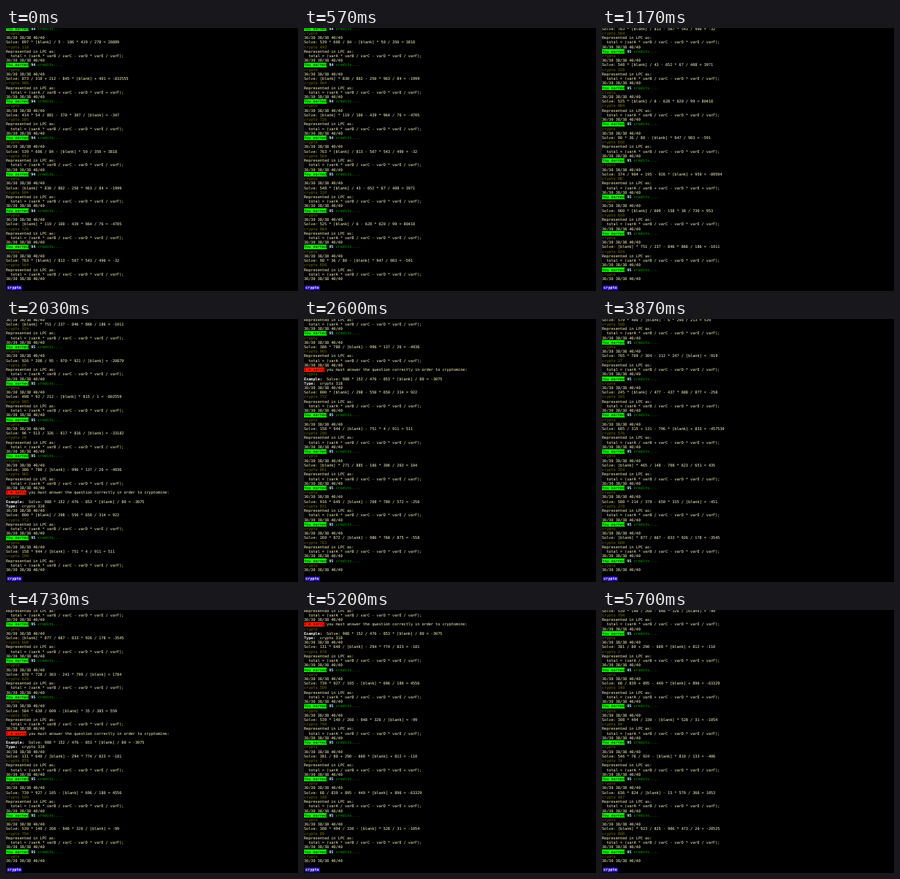
Recreate the animation shown at these times as an HTML page. Size 400 by 360 pixels, loop 5.73 s.

```html
<!DOCTYPE html>
<html lang="en">
<head>
<meta charset="utf-8">
<title>Terminal log</title>
<style>
  html, body { margin: 0; width: 100%; height: 100%; overflow: hidden; background: #000; }
  svg { display: block; width: 100vw; height: 100vh; }
  text {
    font: 5.16px "DejaVu Sans Mono", monospace;
    white-space: pre;
    text-rendering: geometricPrecision;
    fill: #ffffcc;
  }
  .echo { fill: #787000; }
  .dark { fill: #000; }
  .count { fill: #b8ffff; font-weight: bold; }
  .credits { fill: #00a800; }
  .strong { fill: #fff; font-weight: bold; }
</style>
</head>
<body>
<svg viewBox="0 0 400 360">
  <rect width="400" height="360"/>
  <g id="log"></g>
  <rect x="1" y="352.4" width="21" height="6.8" fill="#2408a8"/>
  <text class="strong" x="2" y="357.3">crypto</text>
</svg>
<script>
const LOOP = 5730, FRAMES_PER_MS = 0.03;
const ROW = 6.225, LAST_BASELINE = 345, ROWS = 57, CHAR = 3.106;
const STATUS = "30/30 38/38 40/40";
const FIRST_SHOWN = 13;

// The bracketed operand is the answer; it is printed as [blank].
const problems = `
897 * [118] / 5 - 186 * 419 / 278
873 / 310 + 212 - 845 * [986] + 401
414 * 54 / 881 - 370 * 307 / [305]
539 * 606 / 84 - [493] * 50 / 350
[904] * 830 / 802 - 256 * 963 / 84
[726] * 119 / 100 - 439 * 964 / 76
763 * [564] / 813 - 507 * 543 / 490
548 * [320] / 43 - 652 * 67 / 408
525 * [964] / 6 - 628 * 620 / 99
90 * 36 / 80 - [656] * 947 / 983
374 / 904 + 195 - 926 * [98] + 959
960 * [610] / 609 - 158 * 38 / 730
[924] * 751 / 237 - 846 * 866 / 186
926 * 208 / 95 - 970 * 921 / [39]
498 * 92 / 212 - [985] * 815 / 1
96 * 513 / 326 - 817 * 816 / [20]
386 * 780 / [965] - 996 * 137 / 26
800 * [772] / 298 - 556 * 650 / 314
158 * 944 / [290] - 751 * 4 / 911
[861] * 271 / 885 - 106 * 306 / 203
916 * 649 / [831] - 708 * 780 / 572
269 * 872 / [763] - 986 * 768 / 875
425 * 62 / 766 - [469] * 319 / 676
579 * 480 / [508] - 6 * 298 / 213
765 * 769 / 304 - 312 * 247 / [27]
245 * [165] / 477 - 437 * 688 / 877
685 / 315 + 131 - 796 * [576] + 833
[354] * 465 / 148 - 708 * 623 / 651
588 * 214 / 379 - 650 * 335 / [278]
[600] * 877 / 667 - 833 * 926 / 178
870 * 728 / 303 - 241 * 799 / [628]
584 * 630 / 609 - [501] * 35 / 385
131 * 640 / [878] - 294 * 774 / 823
739 * 927 / 105 - [509] * 696 / 180
539 * 140 / 260 - 948 * 326 / [794]
381 / 80 + 290 - 608 * [2] + 812
68 / 839 + 895 - 440 * [148] + 896
308 * 494 / 330 - [89] * 528 / 31
546 * 76 / 924 - [74] * 810 / 133
636 * 824 / [487] - 15 * 579 / 366
[806] * 923 / 825 - 906 * 473 / 20`.trim().split("\n");

const rejected = new Set([17, 32]);

// Integer arithmetic: each product or quotient is truncated.
function evaluate(expression) {
  const [first, ...rest] = expression.replace(/[[\]]/g, "").split(" ");
  let total = 0, term = +first;
  for (let i = 0; i < rest.length; i += 2) {
    const op = rest[i], value = +rest[i + 1];
    if (op === "*") term *= value;
    else if (op === "/") term = Math.trunc(term / value);
    else { total += term; term = op === "-" ? -value : value; }
  }
  return total + term;
}

const span = (name, text) => `<tspan class="${name}">${text}</tspan>`;
const row = (markup, back = "", length = 0) => ({ markup, back, length });
const echo = text => row(span("echo", text));
const solve = expression =>
  `Solve: ${expression.replace(/\[\d+\]/, "[blank]")} = ${evaluate(expression)}`;

function question(expression) {
  let index = 0;
  const formula = expression.replace(/\[?\d+\]?/g, () => "var" + "ABCDEF"[index++]);
  return [
    row(solve(expression)),
    echo("crypto " + expression.match(/\[(\d+)\]/)[1]),
    row("Represented in LPC as:"),
    row(`  total = (${formula});`),
    row(STATUS)
  ];
}

function reply(number) {
  if (rejected.has(number)) return [
    row(span("dark", "I'm sorry") +
      " you must answer the question correctly in order to cryptomine:", "#ff1a00", 9),
    echo("crypto"),
    row(span("strong", "Example:") + "  " + solve("988 * 152 / 476 - 853 * [318] / 80")),
    row(span("strong", "Type:") + "  crypto 318"),
    row(STATUS)
  ];
  const credits = number < 7 ? 94 : 95;
  return [
    row(`${span("dark", "You earned")} ${span("count", credits)} ${span("credits", "credits....")}`,
      "#10ff00", 10),
    echo("crypto"),
    row(STATUS)
  ];
}

const messages = [reply(0)];
problems.forEach((expression, i) => messages.push(question(expression), reply(i + 1)));

// Pace of arriving messages: [frame, messages since the start].
const pace = [[0, 0], [35, 13], [61, 24], [95, 38], [116, 47], [142, 57], [171, 69]];

function messagesAt(frame) {
  const i = Math.max(1, pace.findIndex(p => p[0] >= frame));
  const [f0, n0] = pace[i - 1], [f1, n1] = pace[i];
  return Math.floor(n0 + (n1 - n0) * (frame - f0) / (f1 - f0) + 0.5);
}

const log = document.getElementById("log");
let shown = -1;

function render(time) {
  const frame = Math.min(171, Math.floor((time % LOOP + 4) * FRAMES_PER_MS));
  const last = FIRST_SHOWN + messagesAt(frame);
  if (last === shown) return;
  shown = last;
  const lines = messages.slice(0, last + 1).flat().slice(-ROWS);
  log.innerHTML = lines.map(({ markup, back, length }, i) => {
    const y = LAST_BASELINE - (lines.length - 1 - i) * ROW;
    const box = back &&
      `<rect y="${y - 4.8}" width="${length * CHAR}" height="${ROW}" fill="${back}"/>`;
    return `${box}<text y="${y}">${markup}</text>`;
  }).join("");
}

const start = performance.now();
function tick() {
  render(performance.now() - start);
  requestAnimationFrame(tick);
}
tick();
</script>
</body>
</html>
```
